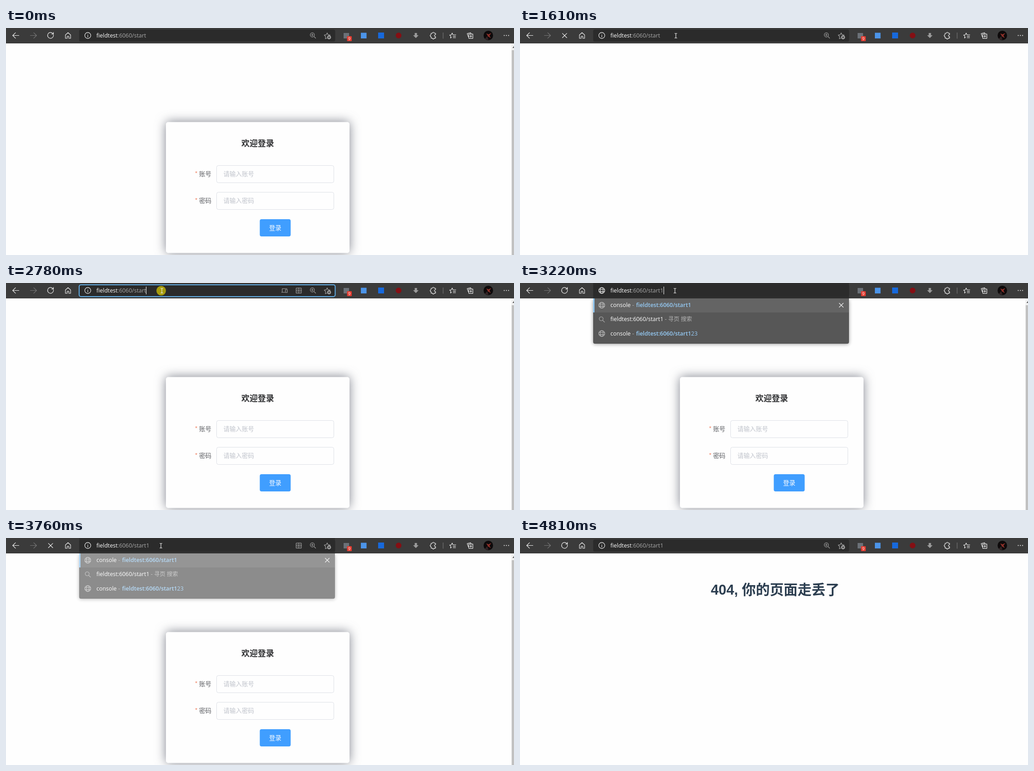
These frames come from a looping animation (1118x501 px, 5.22 s). An HTML page:

```html
<!DOCTYPE html>
<html lang="zh">
<head>
<meta charset="utf-8">
<title>登录</title>
<style>
html, body { margin: 0; width: 100%; height: 100%; overflow: hidden; background: #fefefe; }
svg { display: block; width: 1118px; height: 501px; }
text { font-family: "Open Sans", "Noto Sans CJK SC", "Noto Sans CJK", sans-serif; font-size: 12.4px; white-space: pre; }
.form text { font-family: "Noto Sans CJK SC", "Noto Sans CJK", sans-serif; font-size: 13.5px; }
.line { fill: none; stroke: #f2f2f2; stroke-width: 1.15; stroke-linecap: round; stroke-linejoin: round; }
.dim { stroke: #a3a3a3; }
.field { fill: #fefefe; stroke: #dcdfe6; }
.hint { fill: #c0c4cc; }
.label { fill: #606266; }
.star { fill: #f08a6c; }
.match { fill: #84c3f5; }
.bold { font-weight: 600; }
.soft { fill: #a6a6a6; }
</style>
</head>
<body>
<svg viewBox="0 0 1118 501">
  <defs>
    <filter id="glow" x="-20%" y="-20%" width="140%" height="140%"><feGaussianBlur stdDeviation="11.5"/></filter>
    <filter id="shade" x="-10%" y="-20%" width="120%" height="150%"><feGaussianBlur stdDeviation="4"/></filter>
    <clipPath id="face"><circle cx="1061.5" cy="16.5" r="10.5"/></clipPath>
    <g id="globe" class="line"><circle r="6.5"/><ellipse rx="2.9" ry="6.5"/><path d="M-6 -2.3H6M-6 2.3H6"/></g>
  </defs>
  <rect width="1118" height="501" fill="#fefefe"/>

  <g id="login" class="form">
    <rect x="352" y="207" width="404" height="289" rx="5" fill="#80838d" filter="url(#glow)"/>
    <rect x="352" y="207.5" width="404" height="289" rx="5" fill="#fefefe"/>
    <text x="518" y="260.5" fill="#303133" style="font-size:18px;font-weight:700">欢迎登录</text>
    <text class="star" x="415.5" y="327">*</text><text class="label" x="425" y="327">账号</text>
    <rect class="field" x="463.5" y="303.5" width="258" height="38" rx="4"/>
    <text class="hint" x="478.5" y="327">请输入账号</text>
    <text class="star" x="415.5" y="386">*</text><text class="label" x="425" y="386">密码</text>
    <rect class="field" x="463.5" y="362.5" width="258" height="38" rx="4"/>
    <text class="hint" x="478.5" y="386">请输入密码</text>
    <rect x="558.5" y="422" width="68" height="38" rx="4" fill="#409eff"/>
    <text x="579" y="446" fill="#fff">登录</text>
    <rect x="1112" y="34" width="6" height="467" fill="#f1f1f1"/>
    <rect x="1113" y="49" width="5" height="452" fill="#c1c1c1"/>
    <path d="M1114.5 44l3.5-4v4z" fill="#555"/>
  </g>
  <text id="missing" x="420" y="125" fill="#2c3e50" style="font:700 30.7px 'Liberation Sans','Noto Sans CJK SC','Noto Sans CJK',sans-serif">404, 你的页面走丢了</text>

  <rect width="1118" height="34" fill="#3b3b3b"/>
  <rect x="161" y="3.5" width="563.5" height="26.5" rx="4" fill="#2b2b2b"/>

  <g id="menu">
    <rect x="161" y="37" width="563" height="98" rx="4" fill="#000" opacity=".45" filter="url(#shade)"/>
    <path d="M161 34H724V130a4 4 0 0 1-4 4H165a4 4 0 0 1-4-4z" fill="#3b3b3b"/>
    <path d="M161 0H724V34H161z" fill="#2b2b2b"/>
    <path d="M161 34H724V65H161z" fill="#4a4a4a"/>
    <path d="M161 34h3V65h-3z" fill="#76b9ed"/>
    <use href="#globe" x="180" y="49" opacity=".65"/>
    <use href="#globe" x="180" y="111.5" opacity=".65"/>
    <g class="line dim"><circle cx="178.7" cy="79" r="4.3"/><path d="M182 82.3l4 4"/></g>
    <path class="line" d="M702.5 44.5l9 9M711.5 44.5l-9 9"/>
    <g fill="#fff">
      <text x="199" y="53">console</text>
      <text x="199" y="84"><tspan>fieldtest:6060/start1</tspan><tspan class="soft"> - 寻页 搜索</tspan></text>
      <text x="199" y="115.5">console</text>
    </g>
    <text class="soft" x="247" y="53">-</text>
    <text class="soft" x="247" y="115.5">-</text>
    <text class="match bold" x="255.5" y="53">fieldtest:6060/start1</text>
    <text class="match" x="255.5" y="115.5"><tspan class="bold">fieldtest:6060/start1</tspan>23</text>
  </g>

  <g class="line">
    <path d="M28.5 16.5H15M21 10.3l-6.3 6.2 6.3 6.2"/>
    <path d="M53.5 16.5H67M61 10.3l6.3 6.2-6.3 6.2" stroke="#777"/>
    <path id="reload" d="M104.4 15a6.5 6.5 0 1 1-1.8-3.3l1.6 1.6M104.4 9.6v3.8h-3.8"/>
    <path id="stop" d="M93.3 11.8l9.7 9.7M103 11.8l-9.7 9.7"/>
    <path d="M130.8 15.3l5.7-5 5.7 5V22.7h-3.9v-4.5h-3.6v4.5h-3.9z"/>
    <g id="info"><circle cx="180" cy="16.5" r="6.6"/><path d="M180 15.8v4M180 13.2v.1"/></g>
  </g>
  <use id="site" href="#globe" x="180" y="16.5"/>
  <g class="line dim">
    <g id="device"><path d="M606.5 20.5h7M608 20v-7.5h10.5M615 14.5h4v6.5h-4z"/></g>
    <g id="apps"><rect x="638.5" y="11" width="11.5" height="11.5" rx="1"/><path d="M644.2 11v11.5M638.5 16.7h11.5M641 13.9h.8M646.8 13.9h.8M641 19.6h.8M646.8 19.6h.8"/></g>
    <g id="tools">
      <circle cx="674.2" cy="15.2" r="4.6"/><path d="M677.7 18.7l3.8 3.8M672 15.2h4.4M674.2 13v4.4"/>
      <path d="M706 22.2l-3.2 1.6.7-4.8-3.2-3.4 4.5-.7 2-4.2 2 4.2 4.5.7-1 1.1"/>
      <circle cx="711" cy="20.5" r="3.8" fill="#a3a3a3"/><path d="M709 20.5h4M711 18.5v4" stroke="#2b2b2b"/>
    </g>
  </g>

  <rect x="743" y="11" width="12" height="12" fill="#6b7178"/>
  <rect x="750.5" y="18" width="10.5" height="11" rx="1.5" fill="#e23b30"/>
  <text x="753" y="27" fill="#fff" style="font-size:9px">9</text>
  <rect x="781" y="10.5" width="12.5" height="12.5" fill="#4c94e8"/>
  <rect x="819" y="10" width="13" height="13" fill="#1769dc"/>
  <circle cx="864" cy="16.5" r="6.3" fill="#850f14"/>
  <path d="M899.5 11h5v5h3.5l-6 6.2-6-6.2h3.5z" fill="#9b9b9b"/>
  <g class="line">
    <path d="M935.5 11.5h3a2 2 0 0 1 4 0h3v3.2a2.2 2.2 0 1 0 0 4.3v3.3h-3a2 2 0 0 1-4 0h-3v-3.5a2 2 0 0 1 0-4z"/>
    <path d="M962 10.5v12.5" stroke="#777"/>
    <path d="M980.3 20.5l-2 1.7.6-4-2.6-2.6 3.8-.6 1.8-4 1.8 4M984 15h6M984 18.3h5.500M984 21.500h5.500"/>
    <path d="M1017.500 19.500l-2.500-7.200 7.500-2 1 2.700M1018.500 13.300h9v9.500h-9zM1023 15.600v5M1020.500 18.100h5"/>
  </g>
  <g clip-path="url(#face)">
    <path d="M1050 5h24v24h-24z" fill="#0d0a0b"/>
    <path d="M1057 12l5 2 6-3-4 6 3 5-6-3z" fill="#8c3029"/>
    <path d="M1053 25l6-7 3 8z" fill="#342426"/>
  </g>
  <g fill="#f2f2f2"><circle cx="1096.500" cy="16.500" r="1.1"/><circle cx="1101.300" cy="16.500" r="1.1"/><circle cx="1106.100" cy="16.500" r="1.1"/></g>

  <rect id="selection" x="199" y="8" height="17.500" fill="#9cc3ee"/>
  <text id="url" x="199" y="21"><tspan id="host">fieldtest</tspan><tspan id="path"></tspan></text>
  <path id="caret" d="M.5 8v17" stroke="#fff"/>
  <rect id="focus" x="161" y="4" width="563.500" height="26" rx="4" fill="none" stroke="#62afe8" stroke-width="2"/>

  <circle id="click" cx="341.500" cy="17" r="10.500" fill="#b8ac08" opacity=".88"/>
  <path id="beam" class="line" d="M-2.500-5h1.700L0-4.400.8-5h1.700M0-4.400V4.400M-2.500 5h1.700L0 4.400.8 5h1.700"/>
  <path id="arrow" d="M0 0V13.500l3.100-2.900 2 4.500 2-.9-2-4.400h4.400z" fill="#fff" stroke="#000" stroke-width=".9"/>
</svg>
<script>
const LOOP = 5220;
const $ = id => document.getElementById(id);
const show = (id, on) => $(id).style.display = on ? "" : "none";
const within = (t, ...spans) => spans.some(([from, to]) => t >= from && t < to);
const place = (id, x, y) => $(id).setAttribute("transform", `translate(${x} ${y})`);
const ease = p => p * p * (3 - 2 * p);
const mix = (a, b, p) => a + (b - a) * p;

// The pointer advances in discrete steps, as a screen recorder samples it.
function pointer(t) {
  if (t < 30 || t >= 4810) return null;
  if (t < 390) {
    const p = ease(Math.floor((t - 30) / 51.4) / 7);
    return [mix(1053, 343, p), mix(469, 17, p)];
  }
  if (t < 2970) return [343, 17];
  if (t < 4550) return [341, 17];
  const p = ease((Math.floor((t - 4550) / 52) + 1) / 5);
  return [mix(341, 1055, p), mix(17, 492, p)];
}

function menuOpacity(t) {
  if (!within(t, [3180, 3820])) return 0;
  if (t < 3220) return .4;
  if (t < 3280) return .85;
  if (t < 3720) return 1;
  return t < 3760 ? .85 : .58;
}

function render(t) {
  const typed = t >= 3180;
  const open = within(t, [3180, 3720]);
  const focused = within(t, [590, 1210], [2350, 3180]);
  const selected = within(t, [590, 1210], [2350, 2780]);
  const loading = within(t, [1210, 1910], [3720, 4010]);

  show("login", t < 1550 || within(t, [1800, 3820]));
  show("missing", t >= 3960);
  show("menu", menuOpacity(t) > 0);
  $("menu").setAttribute("opacity", menuOpacity(t));

  show("reload", !loading);
  show("stop", loading);
  show("info", !open);
  show("site", open);
  show("device", focused);
  show("apps", focused || within(t, [3720, 3820]));
  show("tools", !open);
  show("focus", focused);

  $("path").textContent = ":6060/start" + (typed ? "1" : "");
  $("host").setAttribute("fill", selected ? "#202020" : "#fff");
  $("path").setAttribute("fill", selected ? "#202020" : "#a8a8a8");
  const width = $("url").getComputedTextLength();
  $("selection").setAttribute("width", width);
  show("selection", selected);
  place("caret", Math.round(199 + width), 0);
  show("caret", within(t, [2780, 3720]));

  show("click", within(t, [530, 680], [2290, 2450], [2780, 2880]));
  const at = pointer(t);
  const overText = at && at[1] < 30;
  show("beam", overText);
  show("arrow", at && !overText);
  if (at) place(overText ? "beam" : "arrow", ...at);
}

const start = performance.now();
function tick() {
  render((performance.now() - start) % LOOP);
  requestAnimationFrame(tick);
}
tick();
</script>
</body>
</html>
```
